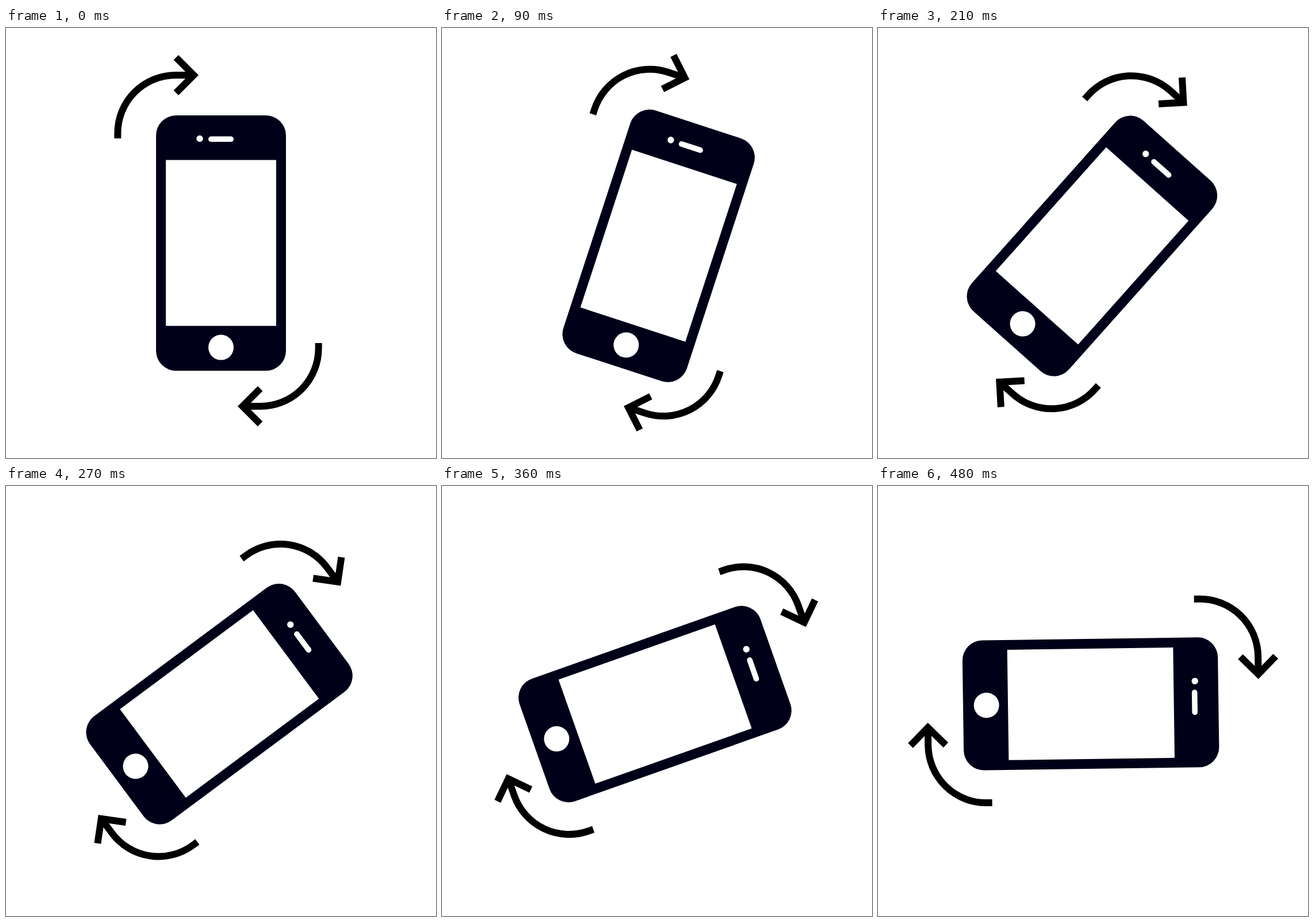
Animation of 748x748 px, one loop 0.98 s. Source, as an HTML page:

```html
<!DOCTYPE html>
<html lang="en">
<head>
<meta charset="utf-8">
<title>Rotate phone</title>
<style>
  html, body { margin: 0; width: 100%; height: 100%; overflow: hidden; background: #fff; }
  svg { display: block; width: 100vw; height: 100vh; }
</style>
</head>
<body>
<svg viewBox="0 0 748 748">
  <g id="scene" fill="#fff">
    <rect x="261" y="152" width="226" height="444.3" rx="35" fill="#000019"/>
    <rect x="278" y="229.6" width="192" height="288.6"/>
    <circle cx="337" cy="192.5" r="5.7"/>
    <rect x="352" y="188.5" width="44" height="9.6" rx="4.8"/>
    <circle cx="374" cy="555.6" r="22"/>
    <g id="arrow" fill="none" stroke="#000" stroke-width="12">
      <path d="M194.3 192V183A101 101 0 0 1 295.3 82H323"/>
      <path d="M295.8 51.3L326.5 82L295.8 112.7"/>
    </g>
    <use href="#arrow" transform="rotate(180 369 370)"/>
  </g>
</svg>
<script>
const LOOP = 980, STEP = 30, STEPS = 16, END_ANGLE = 89.2;
const scene = document.getElementById('scene');

// The upright phone rests off centre; once turning, it drifts slightly up and left and back.
function poseAt(step) {
  if (step === 0) return { angle: 0, x: 369, y: 370 };
  const drift = Math.sin(Math.PI * step / STEPS) ** 2;
  return {
    angle: Math.min(END_ANGLE, step * (6.08 - 0.0168 * step)),
    x: 374.2 - 2.9 * drift,
    y: 373.8 - 1.1 * drift
  };
}

function draw() {
  const time = performance.now() % LOOP;
  const { angle, x, y } = poseAt(Math.min(STEPS, Math.floor(time / STEP)));
  scene.setAttribute('transform', `translate(${x} ${y}) rotate(${angle}) translate(-369 -370)`);
  requestAnimationFrame(draw);
}
draw();
</script>
</body>
</html>
```
